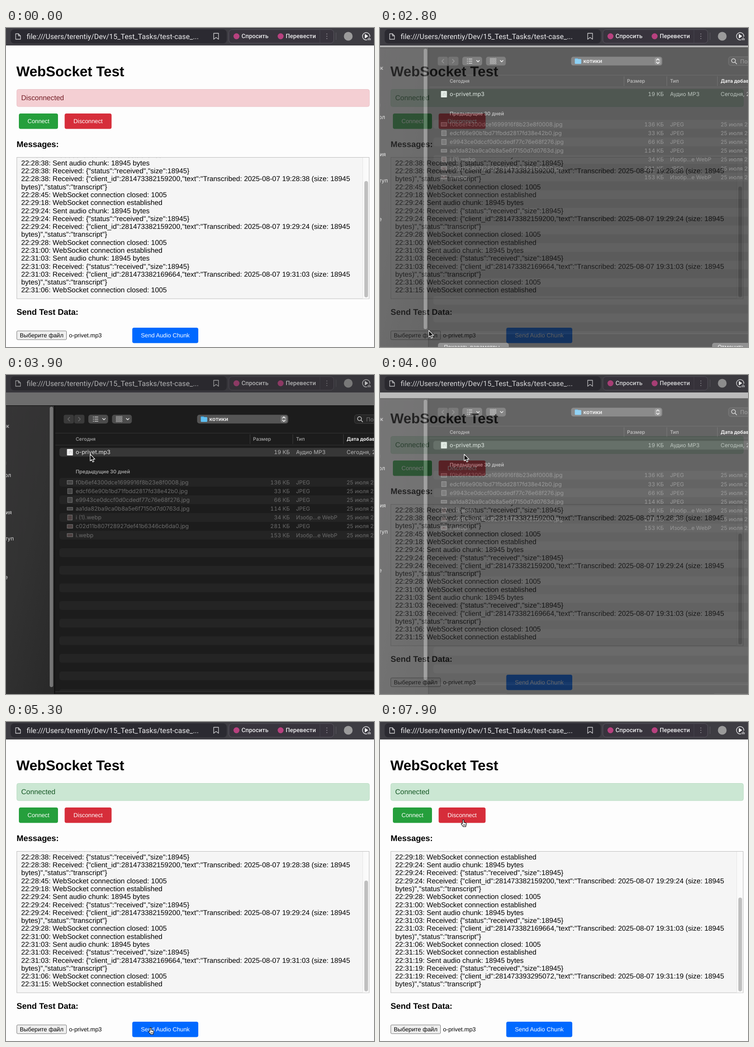
Recreate the animation shown at these times as an HTML page. Size 800x694 px, loop 8000 ms.

```html
<!DOCTYPE html>
<html lang="ru">
<head>
<meta charset="utf-8">
<title>WebSocket Test</title>
<style>
html, body { margin: 0; width: 100%; height: 100%; overflow: hidden; background: #fdfdfd; }
svg { display: block; width: 800px; height: 694px; text-rendering: geometricPrecision; }
.page text { font-family: "Liberation Sans", Arial, sans-serif; white-space: pre; }
.bar text { font-family: Roboto, sans-serif; }
.sheet text { font-family: Inter, sans-serif; }
</style>
</head>
<body>
<svg id="stage" viewBox="0 0 800 694"></svg>
<script>
const LOOP = 8000;
const rect = (x, y, w, h, fill, r = 0, more = '') =>
  `<rect x="${x}" y="${y}" width="${w}" height="${h}" rx="${r}" fill="${fill}" ${more}/>`;
const text = (x, y, str, size, fill = '#000', more = '') =>
  `<text x="${x}" y="${y}" font-size="${size}" fill="${fill}" ${more}>${str}</text>`;
const path = (d, stroke, width = 1.3, fill = 'none') =>
  `<path d="${d}" fill="${fill}" stroke="${stroke}" stroke-width="${width}" stroke-linecap="round" stroke-linejoin="round"/>`;
const circle = (x, y, r, fill, more = '') => `<circle cx="${x}" cy="${y}" r="${r}" fill="${fill}" ${more}/>`;
const BOLD = 'font-weight="700"', SEMI = 'font-weight="600"', MID = 'font-weight="500"';
const END = 'text-anchor="end"', CENTER = 'text-anchor="middle"';

// Message log
const opened = time => `${time}: WebSocket connection established`;
const closed = time => `${time}: WebSocket connection closed: 1005`;
const chunk = (time, id) => [
  `${time}: Sent audio chunk: 18945 bytes`,
  `${time}: Received: {"status":"received","size":18945}`,
  `${time}: Received: {"client_id":${id},"text":"Transcribed: 2025-08-07 ${time.replace('22', '19')} (size: 18945`,
  'bytes)","status":"transcript"}'
];
const log = [
  opened('22:28:34'), ...chunk('22:28:38', '281473382159200'), closed('22:28:45'),
  opened('22:29:18'), ...chunk('22:29:24', '281473382159200'), closed('22:29:28'),
  opened('22:31:00'), ...chunk('22:31:03', '281473382169664'), closed('22:31:06'),
  opened('22:31:15'), ...chunk('22:31:19', '281473393295072')
];
const ROWS = 18, PITCH = 17.28;

// Web page
const buttons = [
  [28, 186, 85, 33.5, '#259f3c', 'Connect'],
  [127.5, 186, 102, 33.5, '#d62d3a', 'Disconnect'],
  [274.5, 652, 143.5, 33.5, '#0069ff', 'Send Audio Chunk']
];
function page() {
  let s = rect(0, 0, 800, 694, '#fdfdfd') + text(22.5, 104.5, 'WebSocket Test', 30.72, '#000', BOLD);
  s += rect(23.5, 133.5, 766.5, 37.5, '', 4, 'id="status"') + text(33, 157, '', 15.36, '', 'id="state"');
  for (const [x, y, w, h, fill, label] of buttons)
    s += rect(x, y, w, h, fill, 4) + text(x + w / 2, y + 21.2, label, 12.8, '#fff', CENTER);
  s += text(23, 259, 'Messages:', 17.97, '#000', BOLD) + text(23, 624, 'Send Test Data:', 17.97, '#000', BOLD);
  s += rect(23.5, 281.5, 766, 307.5, '#f5f5f5', 0, 'stroke="#bdbdbd"');
  s += rect(775, 282, 14, 306.5, '#fafafa') + rect(775, 282, 1, 306.5, '#e6e6e6');
  s += rect(779, 333, 8, 253, '#bfbfbf', 4, 'id="thumb"') + '<g clip-path="url(#logBox)">';
  for (let i = 0; i < ROWS; i++)
    s += text(33, 575.4 - (ROWS - 1 - i) * PITCH, '', 15.36, '#000', 'class="row"');
  s += '</g>' + rect(23.5, 659, 108, 19, '#efefef', 2, 'stroke="#767676"');
  return s + text(30, 673, 'Выберите файл', 12.8) + text(137, 673, 'o-privet.mp3', 12.8);
}

// Browser bar
function bar() {
  let s = rect(0, 0, 800, 38, '#3e3d43') + rect(10, 3, 470, 30.5, '#2b2a31', 8);
  s += path('M21 12.5h6l4.5 4.5v7.5h-10.5zM27 12.5v4.5h4.5', '#d0d0d2');
  s += text(45, 24, 'file:///Users/terentiy/Dev/15_Test_Tasks/test-case_...', 15.8, '#ececee');
  s += path('M451.5 11.5h10.5v13l-5.25-4-5.25 4z', '#d0d0d2');
  s += rect(484.5, 3.5, 228, 29.5, '#38343d', 7, 'stroke="#5a5761"');
  s += circle(501, 18, 6.5, '#b8417f') + text(512, 22.4, 'Спросить', 13, '#ececee', MID);
  s += circle(597, 18, 6.5, '#b8417f') + text(608, 22.4, 'Перевести', 13, '#ececee', MID);
  for (const y of [13, 18, 23]) s += circle(697.5, y, 1, '#9a989f');
  s += rect(682, 5, 1, 27, '#46434c') + rect(717, 10, 1, 16, '#5a5761') + circle(744, 18, 9.5, '#9b9b9b');
  s += circle(783, 18, 8, 'none', 'stroke="#e4e4e6" stroke-width="1.4"') + path('M780.5 14v8l6-4z', '#fff', 1, '#fff');
  s += rect(785, 19, 10, 9, '#3e3d43') + path('M787 26v-3M789.5 26v-5M792 26v-3', '#e4e4e6', 1.3);
  return s + rect(0, 0, 800, 38, '#28282a', 0, 'id="barDim" opacity="0"');
}

// File picker
const files = [
  ['f0b6ef4300dce1699916f8b23e8f0008.jpg', 136], ['edcf66e90b1bd71fbdd2817fd38e42b0.jpg', 33],
  ['e9943ce0dccf0d0cdedf77c76e68f276.jpg', 66], ['aa1da82ba9ca0b8a5e6f7150d7d0763d.jpg', 114],
  ['i (1).webp', 34], ['c02d11b807f28927def41b6346cb6da0.jpg', 281], ['i.webp', 153]
];
const TNUM = 'style="font-variant-numeric:tabular-nums"';
function fileRow(y, name, size, kind, date, main, side) {
  return text(151.5, y, name, 12.3, main) +
    text(617, y, size + ' КБ', 12, side, END + ' ' + TNUM) +
    text(630.5, y, kind, 11.9, side) + text(740.5, y, date, 11.9, side);
}
function sheet() {
  let s = rect(0, 15, 800, 51, '#000', 0, 'id="strip" fill-opacity=".57"');
  s += rect(0, 66, 800, 720, '#1c1c1c') + rect(0, 66, 105, 720, 'url(#side)');
  s += rect(0, 66, 800, 1, '#0c0c0c') + rect(104.5, 66, 2, 720, '#0f0f0f') + rect(95, 69, 7.5, 610, '#757575', 3.7);
  const labels = [[7, 111, 'к'], [1, 191, 'и'], [11, 218, 'ол'], [12.5, 299, 'ия'], [17, 356, 'туп'], [4, 440, 'е']];
  for (const [x, y, str] of labels) s += text(x, y + 4, str, 11.9, '#e0e0e0', END);

  s += rect(125.5, 86.5, 22, 19, '#3a3a3a', 4) + rect(148.5, 86.5, 22, 19, '#3a3a3a', 4);
  s += path('M138.5 92l-4 4 4 4M157.5 92l4 4-4 4', '#6c6c6c', 1.5);
  for (const x of [179, 230.5]) {
    s += rect(x, 86.5, 43, 19, '#4c4c4c', 5);
    s += path(`M${x + 31} 94.5l3 3 3-3`, '#e4e4e4', 1.5);
  }
  for (const y of [91.5, 96, 100.5])
    s += rect(189, y - .7, 2, 1.3, '#e4e4e4') + rect(192.5, y - .7, 8, 1.3, '#e4e4e4');
  for (let i = 0; i < 9; i++)
    s += rect(239.5 + i % 3 * 4.7, 90 + Math.floor(i / 3) * 4.5, 3.4, 2.8, 'none', .5, 'stroke="#d0d0d0" stroke-width=".8"');
  s += rect(415.5, 86.5, 198, 19, '#555', 5) + rect(597, 88.5, 14, 15, '#747474', 4);
  s += path('M601 94l3-3 3 3M601 98l3 3 3-3', '#fff', 1.5);
  s += rect(423.5, 90, 7, 4, '#3d9bd4', 1) + rect(423.5, 91.5, 14, 10.5, '#5fc0f2', 1.5);
  s += text(442, 100, 'котики', 11.9, '#f2f2f2', SEMI);
  s += rect(757.5, 86.5, 60, 19, '#262626', 5, 'stroke="#404040"') + circle(768.5, 95, 4.2, 'none', 'stroke="#ccc" stroke-width="1.5"');
  s += path('M771.8 98.3l3.5 3.7', '#ccc', 1.5) + text(783, 100.5, 'Поиск', 12, '#777');

  s += rect(107, 126, 693, 1, '#343434') + rect(107, 152, 693, 1, '#343434');
  for (const x of [530, 623, 733]) s += rect(x, 129, 1, 21, '#3c3c3c');
  s += text(151.5, 143, 'Сегодня', 10.4, '#a8a8a8', MID) + text(537, 143, 'Размер', 10.6, '#a8a8a8', MID);
  s += text(630.5, 143, 'Тип', 10.6, '#a8a8a8', MID) + text(740.5, 143, 'Дата добавления', 10.6, '#eee', BOLD);
  s += rect(116, 158.5, 700, 19, '#373737', 5, 'id="pick"') + rect(132.5, 161, 13, 14, '#f0f0f0', 1);
  s += path('M137.5 171v-5l4-1v5', '#bbb', 1);
  s += fileRow(172.3, 'o-privet.mp3', 19, 'Аудио MP3', 'Сегодня, 22:15', '#e8e8e8', '#b4b4b4');
  s += text(151.5, 214, 'Предыдущие 30 дней', 10.8, '#a4a4a4', SEMI);

  for (let i = 0; i < 26; i += 2) s += rect(116, 223.8 + i * 19.15, 700, 19, '#242424', 5);
  files.forEach(([name, size], i) => {
    const y = 233.5 + i * 19.15, h = [8, 11, 11, 6, 11, 8, 7][i], w = h > 10 ? 10 : 12;
    s += rect(139 - w / 2, y - h / 2, w, h, i > 3 ? '#4c4040' : '#444', 0, 'stroke="#808080" stroke-width=".9"');
    s += fileRow(y + 4.2, name, size, name.endsWith('webp') ? 'Изобр...е WebP' : 'JPEG', '25 июля 2025', '#6c6c6c', '#6c6c6c');
  });
  s += rect(107, 688.5, 693, 100, '#1c1c1c') + rect(107, 688.5, 693, 1, '#3a3a3a');
  s += rect(126, 709, 154, 20, '#686868', 5) + text(139, 721.5, 'Показать параметры', 11.6, '#eee', MID);
  return s + rect(722, 709, 90, 20, '#686868', 5) + text(734, 721.5, 'Отменить', 11.9, '#eee', MID);
}

const stage = document.getElementById('stage');
stage.innerHTML = `<defs>
  <clipPath id="logBox">${rect(24, 282, 751, 306.5, '#000')}</clipPath>
  <clipPath id="below">${rect(0, 38, 800, 656, '#000')}</clipPath>
  <linearGradient id="side" x2=".6" y2="1"><stop stop-color="#363536"/><stop offset=".5" stop-color="#323232"/><stop offset="1" stop-color="#2a2a2a"/></linearGradient>
</defs>
<g class="page">${page()}</g>
<g class="sheet" clip-path="url(#below)"><g id="sheet">${sheet()}</g></g>
<g class="bar">${bar()}</g>
<g id="cursor">
  <g id="arrow">${path('M0 0v14.5l3.3-3 2.3 5.2 2.5-1.1-2.3-5h4.6z', '#fff', 1.2, '#000')}</g>
  <g id="hand">${path('M-1.4 8V1.5a1.4 1.4 0 0 1 2.8 0V6l3.5.6q1.8.4 1.8 2.2c0 3-1 3.5-1.2 6.5H-.3C-.7 12.8-3.4 11.8-4.3 9.6c-.5-1.3 1-2 2-1z', '#000', 1.1, '#fff')}${path('M2.2 10v3M4 10v3M.4 10v3', '#000', .7)}</g>
</g>`;

const el = id => document.getElementById(id);
const set = (id, attrs) => { for (const k in attrs) el(id).setAttribute(k, attrs[k]); };
const rows = [...document.querySelectorAll('.row')];
const ramp = (t, a, b) => Math.min(1, Math.max(0, (t - a) / (b - a)));
const ease = u => u * u * (3 - 2 * u);

// Pointer stops: time, x, y
const stops = [
  [300, 420, 710], [1050, 87, 199.5], [1800, 87, 199.5], [2500, 106, 658], [2850, 106, 658],
  [3200, 221, 304], [3300, 221, 304], [3650, 183, 172.5], [4150, 183, 172.5], [5100, 314.5, 664.5],
  [5800, 314.5, 664.5], [7300, 181, 212.5], [LOOP, 181, 212.5]
];
function pointer(t) {
  const i = stops.findIndex(s => s[0] > t);
  if (i < 1) return [420, 710];
  const [a, x, y] = stops[i - 1], [b, x2, y2] = stops[i], u = ease(ramp(t, a, b));
  return [x + (x2 - x) * u, y + (y2 - y) * u];
}

function draw(t) {
  const online = t >= 1400, sent = t >= 5500;
  set('status', online ? { fill: '#cbe7d3', stroke: '#b9dcc3' } : { fill: '#f4cfd3', stroke: '#e9c2c7' });
  set('state', { fill: online ? '#155724' : '#721c24' });
  el('state').textContent = online ? 'Connected' : 'Disconnected';
  const count = log.length - (sent ? 0 : online ? 4 : 5);
  rows.forEach((row, i) => row.textContent = log[count - ROWS + i] || '');
  const top = sent ? 382 : online ? 345 : 333;
  set('thumb', { y: top, height: 586 - top });

  const shown = ramp(t, 2700, 2843) * (1 - ramp(t, 3920, 4170));
  const shift = -28 * (1 - ramp(t, 2757, 3057)) - 47 * ramp(t, 3920, 4170);
  set('sheet', { opacity: shown, transform: `translate(0 ${shift})`, visibility: shown ? 'visible' : 'hidden' });
  set('strip', { opacity: shown });
  set('pick', { opacity: t >= 3700 ? 1 : 0 });
  set('barDim', { opacity: .5 * ramp(t, 2850, 3100) * (1 - ramp(t, 3800, 4060)) });

  const [x, y] = pointer(t);
  const over = !shown && buttons.some(([bx, by, w, h]) => x > bx && x < bx + w && y > by && y < by + h);
  set('cursor', { transform: `translate(${x} ${y})` });
  set('hand', { opacity: over ? 1 : 0 });
  set('arrow', { opacity: over ? 0 : 1 });
}

function tick() {
  draw(performance.now() % LOOP);
  requestAnimationFrame(tick);
}
tick();
</script>
</body>
</html>
```
